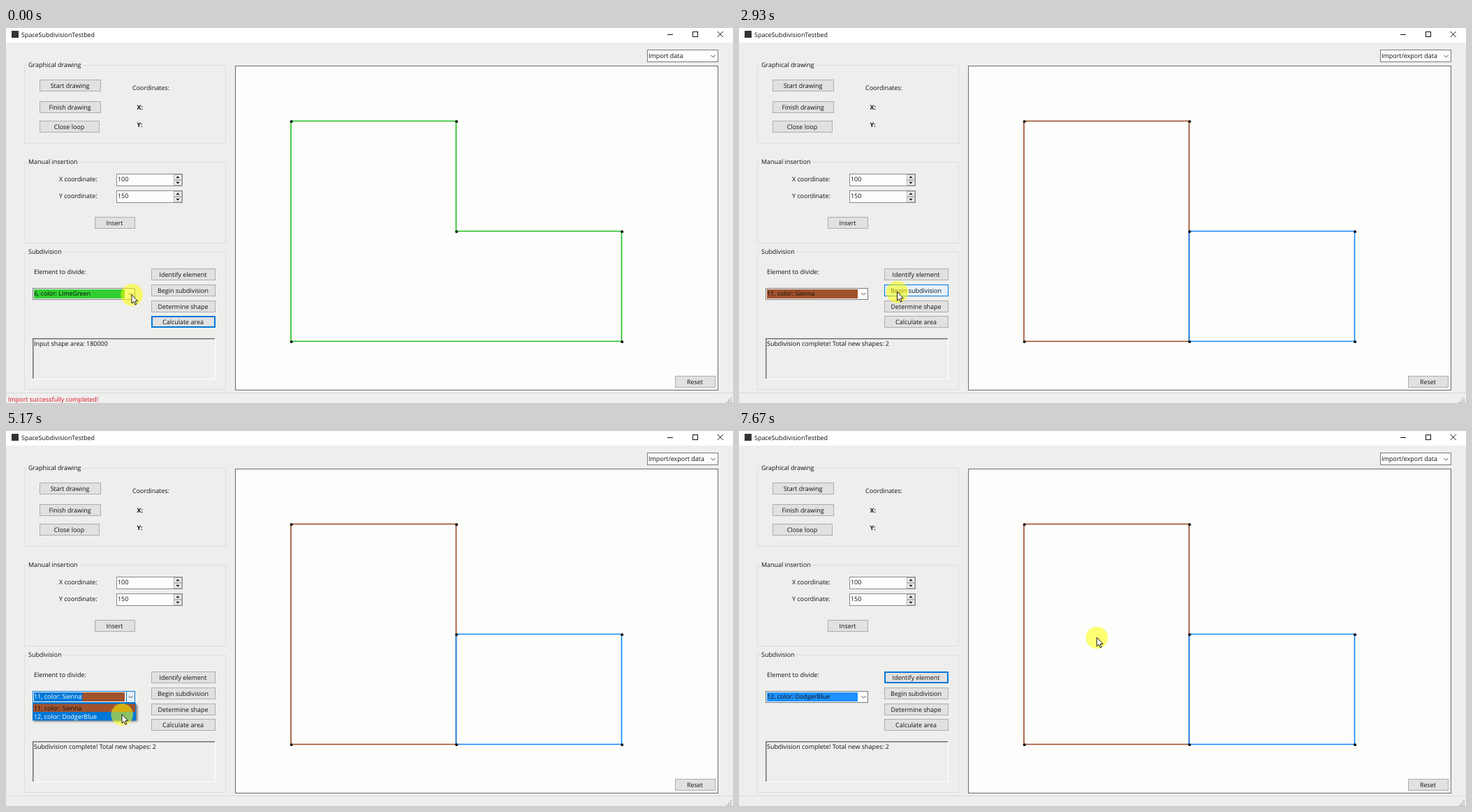
These frames come from a looping animation (1041 px wide and 538 px high, 8000 ms). An HTML page with a canvas:

```html
<!DOCTYPE html>
<html lang="en">
<head>
<meta charset="utf-8">
<title>SpaceSubdivisionTestbed</title>
<style>
html, body { margin: 0; width: 100%; height: 100%; overflow: hidden; background: #eeeeed; }
canvas { display: block; width: 1041px; height: 538px; }
</style>
</head>
<body>
<canvas id="stage" width="1041" height="538"></canvas>
<script>
const g = document.getElementById('stage').getContext('2d');
const LOOP = 8000;
const FONT = '"Open Sans", "Noto Sans", sans-serif';
const GREY = '#eeeeed', PAPER = '#fdfdfc', BLUE = '#0078d7', INK = '#101010';
const LIME = '#32cd32', SIENNA = '#a0522d', DODGER = '#1e90ff';

// Moments at which the interface changes
const AT = { open1: 630, blur: 1030, close1: 1480, split: 2570, open2: 4110, close2: 5690, identify: 6600 };

// Pointer stops: time, x, y
const PATH = [
  [0, 180, 382.5], [1030, 180, 382.5], [1270, 176, 384], [1500, 168, 397],
  [1730, 168, 397], [2300, 226.5, 378.5], [3170, 226.5, 378.5], [3900, 180, 383],
  [4450, 180, 383], [5100, 166, 406.5], [5700, 166, 406.5], [6370, 216.5, 358.5],
  [6520, 222, 351], [6750, 222, 351], [7230, 512.3, 296.2], [8000, 512.3, 296.2]
];

const BUTTONS = [
  ['Start drawing', 48, 74, 88, 17], ['Finish drawing', 48, 105, 88, 17],
  ['Close loop', 48, 133, 86, 17], ['Insert', 127, 271, 58, 17],
  ['Identify element', 208, 345, 92, 17], ['Begin subdivision', 208, 368, 92, 17],
  ['Determine shape', 208, 391, 92, 17], ['Calculate area', 208, 413, 92, 17],
  ['Reset', 958, 499, 58, 17]
];

function pointer(t) {
  const i = PATH.findIndex((p, k) => k && t <= p[0]);
  const [a, b] = [PATH[i - 1], PATH[i]];
  const u = (t - a[0]) / (b[0] - a[0]), e = u * u * (3 - 2 * u);
  return { x: a[1] + (b[1] - a[1]) * e, y: a[2] + (b[2] - a[2]) * e };
}

function rect(x, y, w, h, color) {
  g.fillStyle = color;
  g.fillRect(x, y, w, h);
}

function box(x, y, w, h, edge, fill, line = 1) {
  rect(x, y, w, h, edge);
  rect(x + line, y + line, w - 2 * line, h - 2 * line, fill);
}

function setFont(weight = 400) {
  g.font = `${weight} 8.95px ${FONT}`;
}

function text(s, x, y, color = INK, align = 'left', weight) {
  setFont(weight);
  g.textAlign = align;
  g.fillStyle = color;
  g.fillText(s, x, y);
}

function line(points, color, width = 1, close = false) {
  g.beginPath();
  points.forEach(([x, y]) => g.lineTo(x, y));
  if (close) g.closePath();
  g.strokeStyle = color;
  g.lineWidth = width;
  g.stroke();
}

function chevron(x, y) {
  line([[x - 3, y - 1.5], [x, y + 1.5], [x + 3, y - 1.5]], '#444');
}

function titleBar() {
  rect(0, 0, 1041, 21, '#fff');
  rect(8, 4, 10, 10, '#333');
  text('SpaceSubdivisionTestbed', 22, 12.5);
  rect(947, 9, 8, 1, '#111');
  g.strokeStyle = '#111';
  g.lineWidth = 1;
  g.strokeRect(983.5, 5.5, 7, 7);
  line([[1018.7, 5], [1026.7, 13]], '#111');
  line([[1026.7, 5], [1018.7, 13]], '#111');
}

function group(label, y, h) {
  box(26, y, 289, h, '#dddddd', GREY);
  setFont();
  rect(30, y - 2, g.measureText(label).width + 4, 5, GREY);
  text(label, 32, y + 3);
}

function spinner(label, value, y) {
  text(label, 76, y + 11);
  box(158, y, 95, 18, '#8a8a8a', PAPER);
  text(value, 160, y + 11);
  for (const d of [-1, 1]) {
    const top = d < 0 ? y + 1 : y + 9, mid = top + 4;
    box(240, top, 12, 8, '#b5b5b5', '#ececec');
    g.beginPath();
    g.moveTo(243.2, mid - d * 1.3);
    g.lineTo(248.8, mid - d * 1.3);
    g.lineTo(246, mid + d * 1.7);
    g.fillStyle = '#222';
    g.fill();
  }
}

function button([label, x, y, w, h], focus, p) {
  const hot = p.x >= x && p.x < x + w && p.y >= y && p.y < y + h;
  if (hot) box(x, y, w, h, BLUE, '#e5f1fb');
  else if (label === focus) box(x, y, w, h, BLUE, '#e1e1e1', 2);
  else box(x, y, w, h, '#adadad', '#e1e1e1');
  text(label, x + w / 2 - 0.5, y + 11.6, INK, 'center');
}

function panel(split) {
  box(328, 54, 692, 466, '#6a6a6a', PAPER);
  const [l, m, r, t, c, b] = [408, 644.5, 881.5, 133.5, 291.5, 449.5];
  const dots = [[l, t], [m, t], [m, c], [r, c], [r, b], [l, b]];
  if (split) {
    line([[l, t], [m, t], [m, b], [l, b]], '#994a24', 1.6, true);
    line([[m, c], [r, c], [r, b], [m, b]], '#0f86fa', 1.6, true);
    dots.push([m, b]);
  } else {
    line(dots, '#1cbd1c', 1.6, true);
  }
  g.fillStyle = '#000';
  for (const [x, y] of dots) {
    g.beginPath();
    g.arc(x + 0.7, y + 0.7, 1.9, 0, 7);
    g.fill();
  }
}

function elementBox(label, color, open, focused) {
  box(38, 373, 147, 17, open || focused ? BLUE : '#7a7a7a', PAPER);
  rect(40, 375, 130, 13, color);
  if (open) {
    setFont();
    rect(40, 375, g.measureText(label).width + 1, 13, BLUE);
    box(172, 373, 13, 17, BLUE, '#e5f1fb');
  }
  text(label, 40, 384, open ? '#fff' : INK);
  chevron(178.5, 381.5);
}

function dropList(items, color, active, shown) {
  const h = 2 + 11.7 * items.length;
  g.save();
  g.beginPath();
  g.rect(30, 390, 170, (h + 5) * shown);
  g.clip();
  g.save();
  g.shadowColor = 'rgba(0,0,0,.55)';
  g.shadowBlur = 3;
  g.shadowOffsetX = g.shadowOffsetY = 2;
  rect(38, 390, 148, h, BLUE);
  g.restore();
  items.forEach((s, i) => {
    const y = 391.5 + 11.7 * i;
    rect(39, y, 146, 11.7, i === active ? BLUE : color);
    text(s, 40, y + 9.3, i === active ? '#fff' : INK);
  });
  g.restore();
}

function logBox(message) {
  rect(38, 445, 262, 59, '#fff');
  rect(38, 445, 261, 58, '#707070');
  rect(39.5, 446.5, 259.5, 56.5, GREY);
  text(message, 40, 456);
}

function statusBar(message) {
  rect(0, 523, 1041, 1, '#d9d9d9');
  text(message, 3, 535.7, '#e01020');
  for (let i = 0; i < 3; i++)
    for (let j = 0; j <= i; j++) rect(1037 - 3 * j, 530 + 3 * i, 2, 2, '#b5b5b5');
}

function drawPointer({ x, y }) {
  g.beginPath();
  g.arc(x + 0.2, y + 0.4, 15.8, 0, 7);
  g.fillStyle = 'rgba(255,255,0,.54)';
  g.fill();
  g.save();
  g.translate(x, y);
  g.beginPath();
  [[0, 0], [0, 12.6], [2.9, 10], [4.9, 14.6], [6.8, 13.8], [4.9, 9.3], [8.8, 9.3]]
    .forEach(q => g.lineTo(...q));
  g.closePath();
  g.fillStyle = '#fff';
  g.fill();
  g.strokeStyle = '#000';
  g.lineWidth = 0.9;
  g.stroke();
  g.restore();
}

function focusAt(t) {
  if (t < AT.blur) return 'Calculate area';
  if (t < 2500) return 'combo';
  if (t < AT.open2) return 'Begin subdivision';
  return t < AT.identify ? 'combo' : 'Identify element';
}

function draw(t) {
  const split = t >= AT.split, p = pointer(t), focus = focusAt(t);
  const first = t >= AT.open1 && t < AT.close1;
  const open = first || (t >= AT.open2 && t < AT.close2);
  const items = split ? ['11, color: Sienna', '12, color: DodgerBlue'] : ['6, color: LimeGreen'];
  const chosen = t >= AT.close2 ? 1 : 0;
  const color = !split ? LIME : chosen ? DODGER : SIENNA;

  rect(0, 0, 1041, 538, GREY);
  titleBar();
  group('Graphical drawing', 53, 113);
  text('Coordinates:', 181, 89);
  text('X:', 187.5, 116.7, INK, 'left', 700);
  text('Y:', 187.5, 142, INK, 'left', 700);
  group('Manual insertion', 192, 117);
  spinner('X coordinate:', '100', 209);
  spinner('Y coordinate:', '150', 233);
  group('Subdivision', 321, 198);
  text('Element to divide:', 40, 353.3);

  box(918, 31, 102, 18, '#7a7a7a', PAPER);
  text(split ? 'Import/export data' : 'Import data', 920, 43);
  chevron(1012.5, 40.5);

  panel(split);
  BUTTONS.forEach(b => button(b, focus, p));
  logBox(split ? 'Subdivision complete! Total new shapes: 2' : 'Input shape area: 180000');
  statusBar(split ? '' : 'Import successfully completed!');
  elementBox(items[chosen], color, open, focus === 'combo');
  if (open) {
    const shown = Math.min(1, (t - (first ? AT.open1 : AT.open2) + 30) / 150);
    dropList(items, color, split && p.y > 403 ? 1 : 0, shown);
  }
  drawPointer(p);
}

g.textRendering = 'geometricPrecision';
const start = performance.now();
function tick() {
  draw((performance.now() - start) % LOOP);
  requestAnimationFrame(tick);
}
tick();
</script>
</body>
</html>
```
